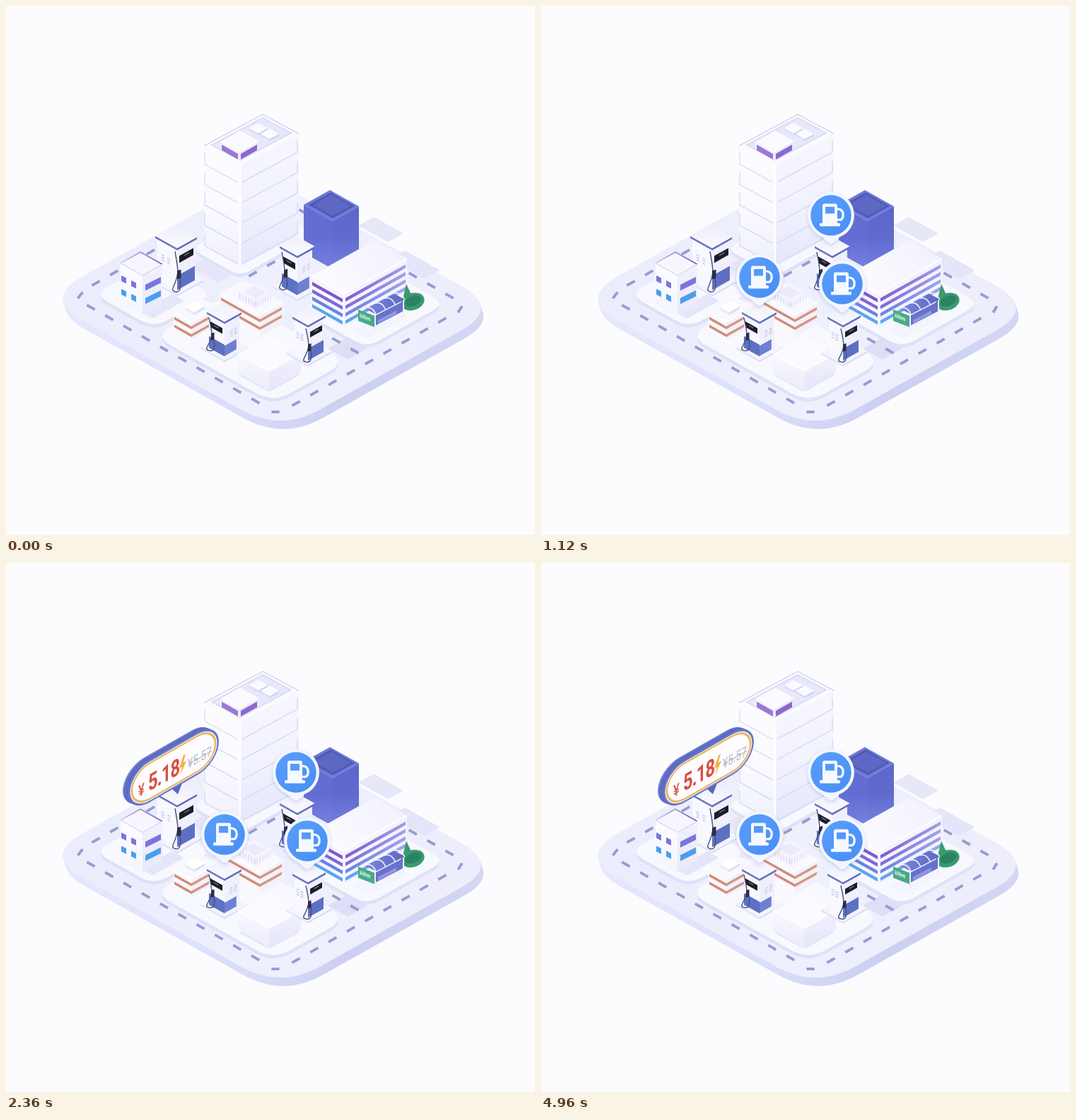
Write an HTML page with a canvas that moves like this. It is 748x748 px and loops after 5000 ms.

```html
<!DOCTYPE html>
<html>
<head>
<meta charset="utf-8">
<style>
html, body { margin: 0; width: 100%; height: 100%; overflow: hidden; background: #fcfcff; }
canvas { display: block; width: 748px; height: 748px; }
</style>
</head>
<body>
<canvas id="stage" width="748" height="748"></canvas>
<script>
const SIZE = 748, LOOP = 5000, SLOPE = 0.56;
const WHITE = '#fbfbff';

function makeLayer() {
  const canvas = document.createElement('canvas');
  canvas.width = canvas.height = SIZE;
  return canvas.getContext('2d');
}

const stage = document.getElementById('stage').getContext('2d');
const city = makeLayer(), overlay = makeLayer();
let g = city;

// ---- Drawing helpers ----

function fade(x0, y0, x1, y1, ...colors) {
  const grad = g.createLinearGradient(x0, y0, x1, y1);
  colors.forEach((c, i) => grad.addColorStop(i / (colors.length - 1), c));
  return grad;
}
const down = (y, h, ...colors) => fade(0, y, 0, y + h, ...colors);
const across = (x, w, ...colors) => fade(x, 0, x + w, 0, ...colors);

function fillPath(color) {
  g.fillStyle = color;
  g.fill();
}

function strokePath(color, width) {
  g.strokeStyle = color;
  g.lineWidth = width;
  g.stroke();
}

function trace(p) {
  g.beginPath();
  for (let i = 0; i < p.length; i += 2) g.lineTo(p[i], p[i + 1]);
}

function poly(color, ...p) {
  trace(p);
  g.closePath();
  fillPath(color);
}

function line(color, width, ...p) {
  trace(p);
  strokePath(color, width);
}

// ---- Isometric helpers: (x, y) is the front corner, a and b run back to the left and right ----

const rhombus = (x, y, a, b, s = SLOPE) =>
  [[x, y], [x - a, y - a * s], [x - a + b, y - (a + b) * s], [x + b, y - b * s]];

function roof(color, x, y, a, b, s) {
  poly(color, ...rhombus(x, y, a, b, s).flat());
}

function pad(color, x, y, a, b, r) {
  const corners = rhombus(x, y, a, b);
  const toward = ([px, py], [qx, qy]) => {
    const k = r / Math.hypot(qx - px, qy - py);
    return [px + (qx - px) * k, py + (qy - py) * k];
  };
  g.beginPath();
  corners.forEach((c, i) => {
    g.lineTo(...toward(c, corners[(i + 3) % 4]));
    g.quadraticCurveTo(...c, ...toward(c, corners[(i + 1) % 4]));
  });
  g.closePath();
  fillPath(color);
}

function island(x, y, a, b, r) {
  pad('#dfe1f7', x, y + 5, a, b, r);
  pad('#f8f8ff', x, y, a, b, r);
}

// Strip along a wall; a negative width runs to the left.
function band(color, x, y, w, h, s = SLOPE) {
  const end = y - Math.abs(w) * s;
  poly(color, x, y, x + w, end, x + w, end + h, x, y + h);
}

function block(x, y, a, b, h, top, left, right, s = SLOPE) {
  band(left, x, y, -a, h, s);
  band(right, x, y, b, h, s);
  roof(top, x, y, a, b, s);
}

function rim(color, width, x, y, a, b, s = SLOPE) {
  line(color, width, x - a, y - a * s, x, y, x + b, y - b * s);
}

function dashes(x, y, sx, sy, count) {
  for (let i = 0; i < count; i++) {
    const cx = x + sx * 25.85 * i, cy = y + sy * 14.7 * i;
    line('#959cd2', 3.8, cx - sx * 5.6, cy - sy * 3.2, cx + sx * 5.6, cy + sy * 3.2);
  }
}

// ---- City ----

function ground() {
  const side = across(80, 600, '#e6e8fd', '#dee1fb', '#cbd0f1', '#d3d7f4');
  for (let d = 12; d > 0; d -= 2) pad(side, 388 + d * 0.3, 602 + d, 336, 312, 65);
  pad(across(80, 590, '#ebecfc', '#eff0fd', '#ededfb'), 388, 602, 336, 312, 65);
  pad('#e6e8f8', 540, 334, 42, 22, 2);
  island(331, 382, 69, 105, 16);
  island(209, 455, 84, 84, 22);
  island(378, 561, 169, 104, 28);
  island(510, 483, 94, 111, 20);
  pad('#dcdff5', 483, 500, 28, 28, 2);
  pad('#e3e5f8', 592, 386, 50, 22, 2);
  pad('#e5e6f9', 207, 442, 17, 45, 2);
  pad('#e5e6f9', 300, 391, 40, 20, 2);
  dashes(120, 426, 1, 1, 10);
  dashes(410, 562, 1, -1, 9);
  dashes(627, 410, -1, -1, 3);
  dashes(127, 392, 1, -1, 4);
  dashes(349, 379, 1, -1, 2);
  dashes(467, 473, 1, 1, 2);
  dashes(420, 291, 1, 1, 1);
  dashes(381, 574, 1, 0, 1);
  dashes(105, 409, 0.6, -1.4, 1);
  dashes(642, 429, 0.5, -1.4, 1);
}

function tower() {
  const x = 331, y = 225, a = 51, b = 83, s = 0.535;
  block(x, y, a, b, 143, WHITE, down(y, 143, '#fcfcff', '#f9f9ff', '#efeffd'),
    down(190, 170, '#f6f6fe', '#f3f3fe', '#e6e7fb'), s);
  for (let i = 0; i < 5; i++) {
    const fy = y + 26 + i * 28.8;
    const left = fy - a * s, right = fy - b * s;
    line('#d5d6f3', 1.2, x - 4, fy - 2, x - a + 1, left, x - a + 1, left - 17);
    line('#d9daf6', 1.5, x + 3, fy - 2, x + b - 2, right, x + b - 2, right - 16);
  }
  line('#ffffff', 2.5, x, y, x, y + 143);
  roof('#dadcf6', x, y - 6, 42, 74, s);
  roof('#e8e8fb', x, y - 8, 38, 70, s);
  line('#c4c7eb', 1.2, x - a, y - a * s, x - a + b, y - (a + b) * s, x + b, y - b * s);
  block(330, 207, 27, 28, 11, WHITE, '#f3f0fd', '#ece8fa');
  band('#9b79d3', 328, 209, -23, 8);
  band('#8a69cf', 332, 209, 23, 8);
  for (const i of [0, 1]) block(357 + i * 16, 180 + i * 8, 13, 13, 3, WHITE, '#dcdcf6', '#d0d2f1');
}

function blueBlock() {
  const x = 462, y = 304;
  block(x, y, 41, 37, 68, '#6f79dc', down(285, 85, '#636ed3', '#626dd2', '#7581de'),
    down(285, 85, '#5b67cb', '#5f6bcf', '#7480dd'));
  roof('#505ab4', x, y - 4, 34, 31);
  roof('#5d67c4', x, y - 7, 28, 26);
}

function stripedHall() {
  const x = 478, y = 407, a = 46, b = 89;
  block(x, y, a, b, 48, fade(440, 390, 560, 350, WHITE, '#f2f2fd'), '#f7f6ff', '#f3f3ff');
  ['#8059cb', '#7d68d8', '#6683e4', '#58a6f0'].forEach((c, i) => {
    const sy = y + 7 + i * 10.5;
    band(c, x - 2, sy, -a + 3, 5);
    band(across(x, b, c, '#a3a0ea'), x + 2, sy - 1, b - 4, 5);
  });
  rim('#ffffff', 2, x, y, a, b);
}

function cube() {
  const x = 193, y = 381, a = 31, b = 28;
  block(x, y, a, b, 56, '#f7f6ff', down(365, 70, '#fdfdff', '#f4f4fe'), down(365, 70, '#f2f1fd', '#e9e9fb'));
  line(across(x - a, a + b, '#d6d3f1', '#9a8fd4', '#6c61c2'), 1.8,
    x - a, y - a * SLOPE, x - a + b, y - (a + b) * SLOPE, x + b, y - b * SLOPE);
  rim('#dfd4f1', 1.3, x, y, a, b);
  ['#7a76dc', '#4c9eeb'].forEach((c, i) => {
    const wy = y + 13 + i * 19;
    for (const dx of [9, 23]) band(c, x - dx, wy + 2 - dx * 0.5, -7, 8, 0.5);
    band(c, x + 4, wy, 22, 8.5, 0.5);
  });
}

function brickBlock(x, y, a, b, h) {
  block(x, y, a, b, h, '#f8f8ff', '#faf8fd', '#f3f1fb');
  for (const d of [6, 17]) {
    band('#d08c78', x, y + d, 1 - a, 4);
    band('#d59682', x, y + d, b - 1, 4);
  }
  rim('#ffffff', 1.5, x, y, a, b);
}

function brickBlocks() {
  brickBlock(262, 447, 25, 38, 25);
  block(266, 433, 13, 15, 4, '#ffffff', '#ebeaf9', '#e0e0f5');
  brickBlock(359, 437, 56, 32, 31);
  const x = 353, y = 418;
  block(x, y, 24, 22, 9, '#f6f5ff', '#e4e3f7', '#e8e7f9');
  for (let i = 3; i < 22; i += 4)
    for (const side of [-1, 1]) band(WHITE, x + side * i, y - i * SLOPE, side * 1.5, 9);
  roof('#ebebfa', x, y - 4, 17, 15);
}

// dir: 1 when the screen faces right, -1 when it faces left.
function pump(x, y, a, b, h, dir) {
  const top = y + 3, k = h / 50;
  const face = (dir > 0 ? b : a) - 3, back = (dir > 0 ? a : b) - 3;
  block(x, y + h + 5, a + 9, b + 9, 2.5, '#f4f4fe', '#dfe1f7', '#d8dbf4');
  block(x, top, a - 3, b - 3, h - 3, WHITE, '#f8f8ff', '#f0f0fc');
  band('#5e70c4', x, top + h * 0.6, dir * face, h * 0.33);
  if (dir < 0) band('#6f80d0', x, top + h * 0.63, back * 0.8, h * 0.29);
  band('#1c1d2a', x + dir * 3, top + h * 0.17 - 2, dir * (face - 5), h * 0.16);
  band('#777d95', x + dir * face * 0.4, top + h * 0.2 - face * 0.2, dir * face * 0.3, 1.4);
  for (let i = 0; i < 6; i++) {
    const u = back * (i % 2 ? 0.35 : 0.65);
    band('#bcc2df', x - dir * u, top + h * 0.3 + (i >> 1) * 3.5 - u * SLOPE, -dir * 4, 1.3);
  }
  const nx = dir > 0 ? x + 1 : x - a + 7;
  const hang = dir > 0 ? top : top - (a - 7) * SLOPE, ny = hang + h * 0.48;
  g.beginPath();
  g.moveTo(nx - 4, hang + 2);
  g.quadraticCurveTo(nx - 1, hang + h * 0.3, nx, ny);
  g.bezierCurveTo(nx - 1, ny + 16 * k, nx - 12, ny + 22 * k, nx - 5, ny + 24 * k);
  g.bezierCurveTo(nx + 3, ny + 27 * k, nx + 5, ny + 20 * k, nx + 3, ny + 8 * k);
  strokePath('#46507a', 1.4);
  band('#2a2e42', nx - 1, ny, 4.5 * k, 10 * k, 0.3);
  block(x, y, a, b, 3.5, down(y - 30, 30, '#efeff9', '#faf9ff'), '#6b79c0', '#6070bd');
  rim('#ffffff', 1, x, y, a, b);
}

function frontBlock() {
  const x = 372, y = 516, a = 44, b = 45;
  pad('#e2e4f8', x, y + 30, a, b, 6);
  block(x, y, a, b, 28, '#fafaff', down(y - 25, 52, '#f9f9ff', '#ececfb'), down(y - 25, 52, '#f1f1fd', '#e6e6fa'));
  rim('#ffffff', 2, x, y, a, b);
}

function tree() {
  g.beginPath();
  g.ellipse(575, 418, 17, 12, -0.3, 0, 7);
  fillPath('#389a72');
  poly('#389a72', 566, 393, 574, 410, 561, 414);
  g.beginPath();
  g.ellipse(576, 417, 12, 7, -0.4, 0, 7);
  fillPath('#2d8261');
}

function busStop() {
  roof('#f4f4ff', 514, 470, 22, 55);
  band('#6872cc', 522, 438, 41, 14, 0.52);
  band('#8f98e0', 526, 444, 26, 5, 0.52);
  roof(across(508, 56, '#7985d8', '#5d68c5'), 523, 436, 15, 41, 0.52);
  for (let i = 0; i < 4; i++) {
    const x = 508 + i * 13.6, y = 427 - i * 6.8;
    g.beginPath();
    g.moveTo(x, y);
    g.quadraticCurveTo(x + 10, y - 3, x + 15, y + 9);
    strokePath('#f2f3ff', 1.6);
  }
  for (const i of [0, 1]) line('#eceefd', 2, 522 + i * 40, 436 - i * 20, 522 + i * 40, 461 - i * 22);
  band('#48aa84', 521, 438, -23, 16, 0.38);
  g.save();
  g.transform(1, 0.38, 0, 1, 500, 440);
  g.fillStyle = '#eefff7';
  g.font = 'bold 8px Roboto, sans-serif';
  g.fillText('iiilm', 0, 0);
  g.restore();
}

function drawCity() {
  g = city;
  g.fillStyle = '#fcfcff';
  g.fillRect(0, 0, SIZE, SIZE);
  ground();
  tower();
  blueBlock();
  pump(412, 353, 25, 24, 57, -1);
  stripedHall();
  pump(242, 342, 31, 28, 61, 1);
  cube();
  brickBlocks();
  pump(309, 446, 25, 24, 50, -1);
  frontBlock();
  pump(427, 451, 22, 25, 51, 1);
  tree();
  busStop();
}

// ---- Markers ----

function pin(x, y) {
  g.save();
  g.translate(x, y);
  g.save();
  g.shadowColor = 'rgba(110,130,210,.3)';
  g.shadowBlur = 5;
  g.shadowOffsetY = 2;
  g.beginPath();
  g.arc(0, 0, 33, Math.PI * 0.62, Math.PI * 0.38);
  g.quadraticCurveTo(3, 40, 0, 40);
  g.quadraticCurveTo(-3, 40, -12, 31);
  fillPath('#f4f6ff');
  g.restore();
  g.beginPath();
  g.arc(0, 0, 28.8, 0, 7);
  fillPath(fade(-20, -25, 15, 25, '#589dfc', '#4a90f6'));
  g.beginPath();
  g.roundRect(-12, -16.5, 21, 29, 3);
  g.roundRect(-16, 11, 29, 4.5, 1.5);
  fillPath('#f6f9ff');
  g.fillStyle = '#5599fa';
  g.fillRect(-8, -12, 13, 9.5);
  g.beginPath();
  g.moveTo(9, -9);
  g.bezierCurveTo(15, -9, 17.5, -5, 17.2, 0);
  g.bezierCurveTo(16.5, 7, 13, 7, 9, 6);
  strokePath('#f6f9ff', 3.2);
  g.restore();
}

function label(text, x, y, size, weight, color) {
  g.save();
  g.transform(0.72, 0, 0, 1, x, y);
  g.font = `${weight} ${size}px Roboto, sans-serif`;
  g.letterSpacing = weight > 500 ? '-1.2px' : '0px';
  g.fillStyle = color;
  g.fillText(text, 0, 0);
  g.restore();
}

function badge(dy) {
  const pill = (r, color, dx = 0, dy = 0) => {
    g.beginPath();
    g.roundRect(dx - 34 - r, dy - r, 68 + 2 * r, 2 * r, r);
    fillPath(color);
  };
  g.save();
  g.translate(237, 289 + dy);
  poly('#5967bd', -5, 28, 13, 20, 6, 38);
  g.transform(1, -0.57, 0, 1, 0, 0);
  for (let i = 8; i > 0; i--) pill(30, i > 6 ? '#7583d3' : '#5d6bc3', -i, -i * 0.95);
  pill(30, '#6b78cb');
  pill(27.5, '#f8f5f5');
  pill(26.3, '#e9b65f');
  pill(23.8, '#fdfcff');
  label('¥', -50, 14, 23, 500, '#d9564a');
  label('5.18', -36, 14, 33, 700, '#d94e42');
  poly('#f3b13f', 14, -9, 8, 6, 12, 6, 9, 17, 18, 1, 13.5, 1, 17, -9);
  label('¥5.57', 20, 13.5, 19, 400, '#b5b5c2');
  line('#b5b5c2', 1.2, 21, 7.5, 54, 7.5);
  g.restore();
}

// ---- Motion ----

const PIN_RISE = 240, PIN_SETTLE = 240, BADGE_START = 1400, BADGE_RISE = 300;

function progress(t, start, span) {
  const p = Math.min(1, Math.max(0, (t - start) / span));
  return p * p * (3 - 2 * p);
}

// Rise from below with a small overshoot, then settle.
function risingPin(t, start, x, y) {
  const up = progress(t, start, PIN_RISE);
  const settle = progress(t, start + PIN_RISE, PIN_SETTLE);
  showLayer(up, () => pin(x, y + 36 * (1 - up) - 8 * (up - settle)));
}

// Paints onto one layer so that overlapping parts fade together.
function showLayer(alpha, paint) {
  if (!alpha) return;
  overlay.clearRect(0, 0, SIZE, SIZE);
  g = overlay;
  paint();
  stage.globalAlpha = alpha;
  stage.drawImage(overlay.canvas, 0, 0);
}

function render(t) {
  stage.globalAlpha = 1;
  stage.drawImage(city.canvas, 0, 0);
  risingPin(t, 325, 410, 296);
  risingPin(t, 485, 309, 384);
  risingPin(t, 165, 426, 393);
  const shown = progress(t, BADGE_START, BADGE_RISE);
  showLayer(shown, () => badge(13 * (1 - shown)));
}

const began = performance.now();

function tick() {
  const t = (performance.now() - began) % LOOP;
  render(Math.floor(t / 40) * 40);
  requestAnimationFrame(tick);
}

drawCity();
render(0);
requestAnimationFrame(tick);
</script>
</body>
</html>
```
